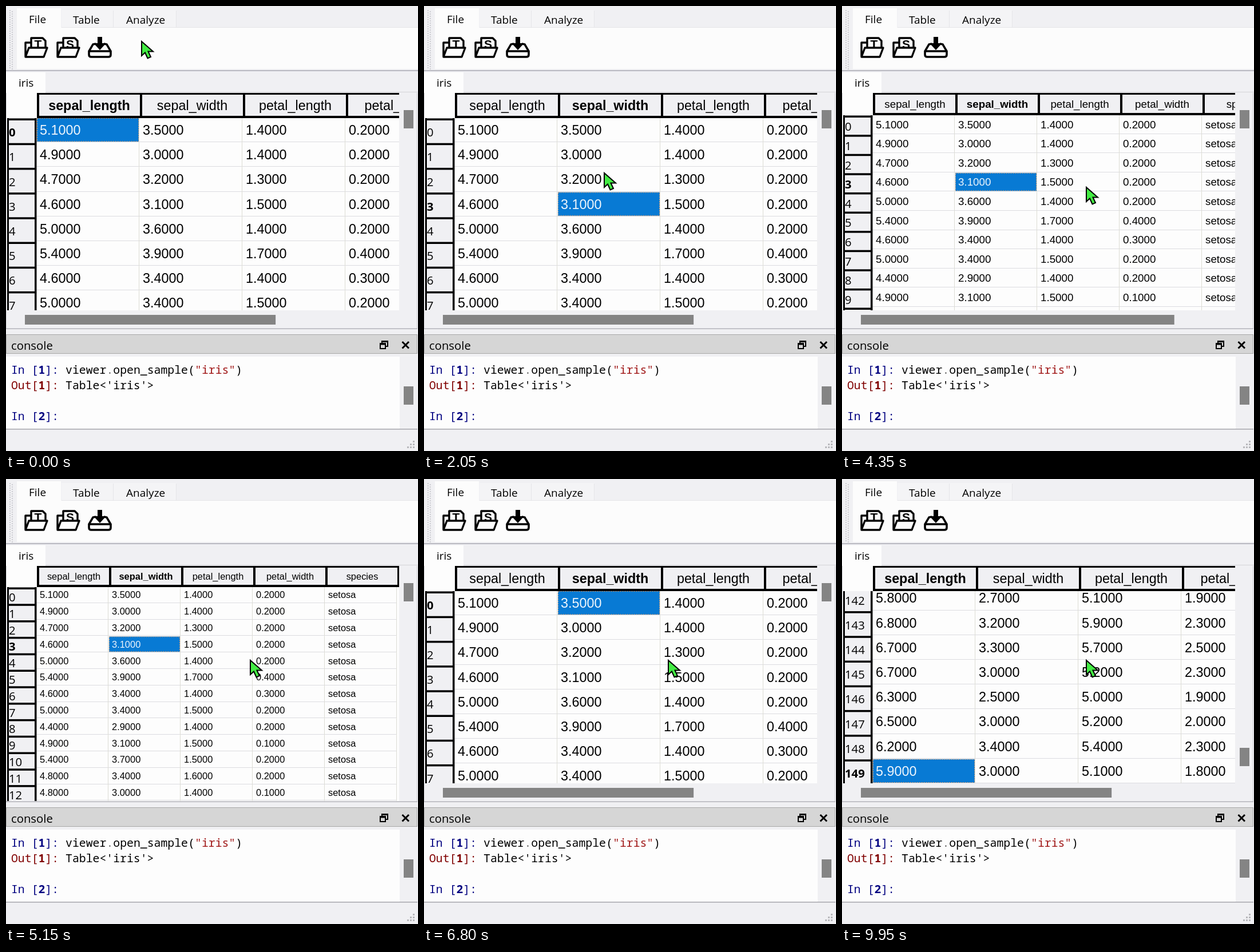
An HTML page with a canvas that plays this animation: 720 px wide and 778 px high, repeating every 10000 ms.

```html
<!DOCTYPE html>
<html lang="en">
<head>
<meta charset="utf-8">
<title>Table viewer</title>
<style>
  html, body { margin: 0; width: 100%; height: 100%; overflow: hidden; background: #f0f0f3; }
  canvas { display: block; }
</style>
</head>
<body>
<canvas id="stage" width="720" height="778"></canvas>
<script>
const ctx = document.getElementById('stage').getContext('2d');
const LOOP = 10000, ROWS = 150;
const UI = '"Open Sans", "Noto Sans", sans-serif';
const CELL = '"Liberation Sans", Arial, sans-serif';
const MONO = '"Noto Sans Mono", "DejaVu Sans Mono", monospace';
const PANEL = '#f0f0f3', PAPER = '#fdfdfd', THUMB = '#848484';

const columns = ['sepal_length', 'sepal_width', 'petal_length', 'petal_width', 'species'];
// Four measurements per row, two digits each, in tenths
const head = ('51351402 49301402 47321302 46311502 50361402 54391704 46341403 ' +
  '50341502 44291402 49311501 54371502 48341602 48301401').split(' ');
const tail = '58275119 68325923 67335725 67305223 63255019 65305220 62345423 59305118'.split(' ');

const cursorPath = [[0, 236, 60], [1100, 236, 60], [2050, 314, 290], [2500, 426, 315]];
const selections = [[0, 0, 0], [700, 0, 1], [1000, 1, 1], [1250, 2, 1], [1500, 3, 1],
  [6600, 0, 1], [7150, 0, 0], [7450, 149, 0]];
const zoomTimes = [[2800, 3200, 3600, 4000, 4400, 4800], [5400, 5550, 5700, 5850, 6000, 6150]];

function box(x, y, w, h, color) {
  ctx.fillStyle = color;
  ctx.fillRect(x, y, w, h);
}

function text(str, x, y, font, color = '#000', align = 'left') {
  ctx.font = font;
  ctx.fillStyle = color;
  ctx.textAlign = align;
  ctx.fillText(str, x, y);
}

function clipped(x, y, w, h, draw) {
  ctx.save();
  ctx.beginPath();
  ctx.rect(x, y, w, h);
  ctx.clip();
  draw();
  ctx.restore();
}

function shape(d, fill, width = 0) {
  const path = new Path2D(d);
  if (fill) { ctx.fillStyle = fill; ctx.fill(path); }
  if (width) {
    ctx.strokeStyle = '#000';
    ctx.lineWidth = width;
    ctx.stroke(path);
  }
}

function at(x, y, draw) {
  ctx.save();
  ctx.translate(x, y);
  draw();
  ctx.restore();
}

function cellText(row, col) {
  const digits = row < head.length ? head[row] : tail[row - ROWS + tail.length];
  if (!digits) return '';
  if (col === 4) return row < 50 ? 'setosa' : 'virginica';
  return (digits.substr(col * 2, 2) / 10).toFixed(4);
}

function folder(x, letter) {
  at(x, 54, () => {
    ctx.lineJoin = 'round';
    shape('M2 34V10H12M12 18V2H32L37 7V18M2 35L8 19H40L34 35Z', null, 3.4);
    clipped(12, 2, 26, 16, () => text(letter, 24, 20, `bold 21px ${CELL}`, '#000', 'center'));
  });
}

function ribbon() {
  for (let y = 7; y < 108; y += 4) {
    box(6, y, 2, 2, '#cdcdd2');
    box(10, y + 2, 2, 2, '#cdcdd2');
  }
  box(19, 38, 701, 72, '#fcfcfc');
  box(97, 7, 201, 31, '#f4f4f6');
  box(97, 37, 623, 1, '#e5e5e8');
  box(187, 8, 1, 29, '#e5e5e8');
  box(297, 8, 1, 29, '#e5e5e8');
  box(19, 4, 77, 35, '#fcfcfc');
  const font = `19px ${UI}`;
  text('File', 40, 30, font);
  text('Table', 117, 31, font);
  text('Analyze', 210, 31, font);
  folder(32, 'T');
  folder(88, 'S');
  at(143, 54, () => {
    shape('M14 12L9 13L2 25V31Q2 35 6 35H36Q40 35 40 31V25L33 13L28 12M3 25H39', null, 3.6);
    shape('M17 0H25V11H32L21 23L10 11H17Z', '#000');
  });
  box(0, 112, 720, 2, '#b9b9c1');
  box(0, 116, 69, 36, PAPER);
  box(69, 150, 651, 1, '#d4d4d8');
  text('iris', 22, 141, font);
}

function dock() {
  box(0, 574, 719, 34, '#a8a8a8');
  box(1, 575, 717, 32, '#d6d6d6');
  text('console', 9, 601, `20.3px ${UI}`);
  shape('M657 589V586H667V595H663M654 590H663V599H654Z', null, 2);
  shape('M653 591H664M657 586.5H668', null, 3);
  shape('M692.5 587L704 598.5M704 587L692.5 598.5', null, 3);

  box(0, 613, 688, 126, PAPER);
  box(695, 665, 17, 32, THUMB);
  box(0, 739, 719, 1.5, '#a6a6ac');
  const step = 11.89, navy = '#000080', red = '#800000';
  const line = (y, parts) => {
    let x = 9;
    for (const [str, color, weight = ''] of parts) {
      text(str, x, y, `${weight} 19.8px ${MONO}`, color);
      x += str.length * step;
    }
  };
  line(643, [['In [', navy], ['1', navy, 'bold'], [']: ', navy], ['viewer', '#000'], ['.', '#666'],
    ['open_sample(', '#000'], ['"iris"', '#a01818'], [')', '#000']]);
  line(670, [['Out[', red], ['1', red, 'bold'], [']: ', red], ["Table<'iris'>", '#000']]);
  line(724, [['In [', navy], ['2', navy, 'bold'], [']:', navy]]);
  for (let i = 0; i < 3; i++)
    for (let j = 0; j <= i; j++) box(711 - j * 5, 760 + i * 5, 3, 3, '#b8b8bc');
}

function table(zoom, selRow, selCol) {
  const colW = 90 * zoom + 18, rowH = 24 * zoom, size = 11.5 * zoom + 2.65;
  const top = Math.round(174.6 + 11.33 * zoom);
  const total = colW * columns.length, scrolls = total > 634;
  const bottom = scrolls ? 532 : 563;
  const atEnd = selRow === ROWS - 1;
  const origin = atEnd ? bottom - rowH * ROWS : top;
  const first = Math.floor((top - origin) / rowH + 0.01);
  const last = Math.min(ROWS - 1, Math.floor((bottom - origin) / rowH));

  box(1, 152, 686, bottom - 152, PAPER);
  clipped(0, top + 1, 687, bottom - top - 1, () => {
    for (let r = first; r <= last; r++) {
      const y = origin + r * rowH, mid = y + rowH / 2;
      const lineY = Math.round(y + rowH) - 1;
      box(53, lineY, total, 1, '#dcdce0');
      for (let c = 0; c < columns.length; c++) {
        const x = 53 + c * colW, picked = r === selRow && c === selCol;
        box(Math.round(x + colW) - 1, y, 1, rowH, '#dcdcd4');
        if (picked) {
          box(x + 1, y + 1, colW - 2, rowH - 2, '#087ad4');
          ctx.strokeStyle = '#d79a68';
          ctx.lineWidth = 1;
          ctx.setLineDash([2, 2]);
          ctx.strokeRect(x + 1.5, y + 1.5, colW - 3, rowH - 3);
          ctx.setLineDash([]);
        }
        text(cellText(r, c), x + 6, mid + size * 0.36, `${size}px ${CELL}`, picked ? '#edf5fc' : '#000');
      }
      box(2, y + 1, 51, rowH + 3, PANEL);
      box(2, y + 1.5, 51, 3.5, '#000');
      text(r, 5, mid + 11.5, `${r === selRow ? 'bold' : ''} 20.3px ${UI}`);
    }
    box(2, top, 3, bottom - top, '#000');
    box(50, top, 3.5, bottom - top, '#000');
  });

  clipped(54, 152, 633, top - 151, () => {
    box(54, 152, total + 4, top - 151, PANEL);
    box(54, 152, total + 4, 3, '#000');
    box(54, top - 3, total + 4, 4, '#000');
    for (let c = 0; c <= columns.length; c++) {
      box(54 + c * colW, 152, 4, top - 151, '#000');
      if (columns[c]) text(columns[c], 55.5 + (c + 0.5) * colW, (152 + top) / 2 + size * 0.36,
        `${c === selCol ? 'bold' : ''} ${size}px ${CELL}`, '#000', 'center');
    }
  });

  box(695, atEnd ? 470 : 182, 17, 32, THUMB);
  if (scrolls) box(33, 540, 622 * 634 / total, 17, THUMB);
  box(0, 152, 1, 412, '#cfcfd3');
  box(718, 152, 1, 412, '#cfcfd3');
  box(0, 563.5, 719, 1.5, '#b4b4ba');
}

function cursor(t) {
  let [, x, y] = cursorPath[cursorPath.length - 1];
  for (let i = 1; i < cursorPath.length; i++) {
    const [t0, x0, y0] = cursorPath[i - 1], [t1, x1, y1] = cursorPath[i];
    if (t >= t0 && t < t1) {
      const k = (t - t0) / (t1 - t0), e = k * k * (3 - 2 * k);
      x = x0 + (x1 - x0) * e;
      y = y0 + (y1 - y0) * e;
    }
  }
  at(x, y, () => {
    ctx.lineJoin = 'miter';
    shape('M1 2V27L7 21.5L11.5 31.5L17 29L12.5 19.5H21Z', '#43ec43', 2);
  });
}

function draw(now) {
  const t = now % LOOP;
  const [, row, col] = selections.filter(s => s[0] <= t).pop();
  const [outs, ins] = zoomTimes.map(times => times.filter(s => s <= t).length);
  box(0, 0, 720, 778, PANEL);
  ribbon();
  table((18 - outs + ins) / 10, row, col);
  dock();
  cursor(t);
  requestAnimationFrame(draw);
}
requestAnimationFrame(draw);
</script>
</body>
</html>
```
